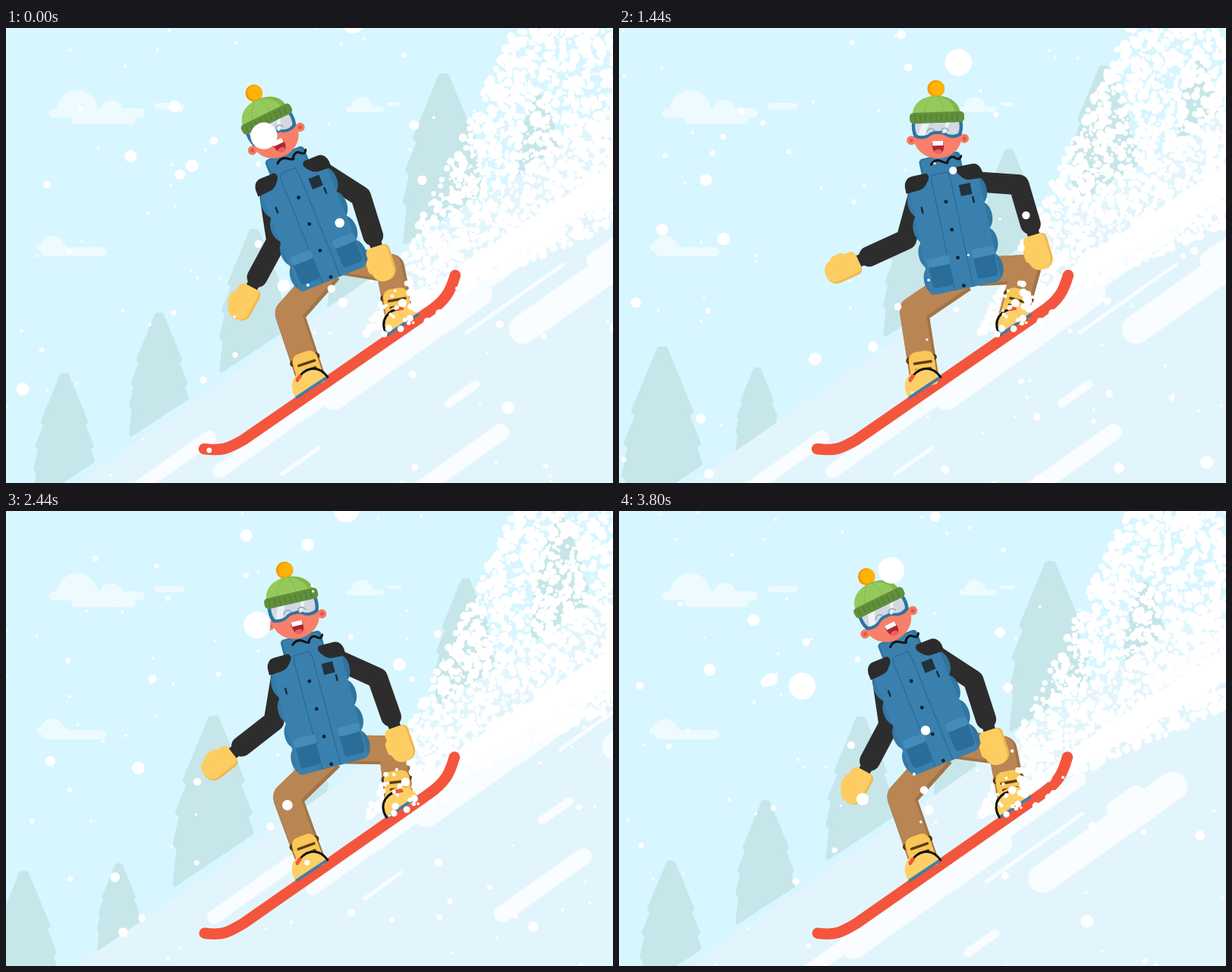
An HTML page with a canvas for the animation above (3.84 s loop, 800 by 600 pixels).

```html
<!DOCTYPE html>
<html lang="en">
<head>
<meta charset="utf-8">
<title>Snowboarder</title>
<style>
html, body { margin: 0; width: 100%; height: 100%; overflow: hidden; background: #d8f6ff; }
canvas { display: block; }
</style>
</head>
<body>
<canvas id="stage" width="800" height="600"></canvas>
<script>
const ctx = document.getElementById('stage').getContext('2d');
const FRAMES = 96, STEP = 40, TAU = Math.PI * 2, RAD = Math.PI / 180;
const mod = (a, b) => ((a % b) + b) % b;

let seed = 41;
const rand = () => (seed = (seed * 16807) % 2147483647) / 2147483647;
const many = (count, make) => Array.from({ length: count }, make);

// ---------- drawing helpers ----------
function fill(color, d) { ctx.fillStyle = color; ctx.fill(new Path2D(d)); }
function stroke(color, width, d, cap = 'round') {
  ctx.strokeStyle = color; ctx.lineWidth = width;
  ctx.lineCap = cap; ctx.lineJoin = 'round';
  ctx.stroke(new Path2D(d));
}
function ellipse(color, x, y, rx, ry = rx) {
  ctx.fillStyle = color;
  ctx.beginPath(); ctx.ellipse(x, y, rx, ry, 0, 0, TAU); ctx.fill();
}
function box(color, x, y, w, h, r = 0) {
  ctx.fillStyle = color;
  ctx.beginPath(); ctx.roundRect(x, y, w, h, r); ctx.fill();
}
function at([x, y], angle, draw) {
  ctx.save(); ctx.translate(x, y); ctx.rotate(angle); draw(); ctx.restore();
}
const poly = pts => 'M' + pts.map(p => p.join()).join('L');

// ---------- pose ----------
// Only the body and the hands are keyed; knees and elbows follow by two-bone IK
const KEYS = [
  { n: 0, hem: [432, 330], tilt: [22, 26], handL: [313, 362], handR: [495, 310] },
  { n: 15, hem: [432, 328], tilt: [26, 27], handL: [281, 338], handR: [461, 306] },
  { n: 36, hem: [458, 342], tilt: [12, 2], handL: [295, 317], handR: [553, 295] },
  { n: 51, hem: [450, 334], tilt: [12, 3], handL: [291, 319], handR: [545, 302] },
  { n: 71, hem: [415, 340], tilt: [18, 24], handL: [272, 351], handR: [494, 313] },
  { n: 83, hem: [413, 349], tilt: [21, 32], handL: [287, 372], handR: [482, 327] }
];
const keyAt = i => KEYS[mod(i, KEYS.length)];
const keyTime = i => keyAt(i).n + FRAMES * Math.floor(i / KEYS.length);

// Periodic cubic Hermite through the keys
function poseAt(n) {
  let i = KEYS.length - 1;
  while (KEYS[i].n > n) i--;
  const span = keyTime(i + 1) - keyTime(i), u = (n - keyTime(i)) / span;
  const ease = u * u * (3 - 2 * u);
  const blend = name => [0, 1].map(c => {
    const v = k => keyAt(k)[name][c];
    const slope = k => (v(k + 1) - v(k - 1)) / (keyTime(k + 1) - keyTime(k - 1)) * span * .8;
    return v(i) + (v(i + 1) - v(i)) * ease
      + slope(i) * u * (1 - u) ** 2 - slope(i + 1) * u * u * (1 - u);
  });
  return { hem: blend('hem'), tilt: blend('tilt'), handL: blend('handL'), handR: blend('handR') };
}

function joint(from, to, upper, lower, bend) {
  const dx = to[0] - from[0], dy = to[1] - from[1];
  const d = Math.min(Math.hypot(dx, dy), upper + lower);
  const open = Math.acos((upper ** 2 + d * d - lower ** 2) / (2 * upper * d));
  const angle = Math.atan2(dy, dx) + bend * open;
  return [from[0] + upper * Math.cos(angle), from[1] + upper * Math.sin(angle)];
}

// ---------- scenery ----------
function clouds() {
  ctx.fillStyle = '#edfbff';
  ctx.beginPath();
  const pill = (x, y, w, h) => ctx.roundRect(x, y, w, h, h / 2);
  const dome = (x, y, r) => { ctx.moveTo(x - r, y); ctx.arc(x, y, r, Math.PI, TAU); };
  pill(57, 106, 126, 12); pill(86, 114, 85, 13); dome(94, 109, 27); dome(139, 110, 15);
  pill(196, 99, 39, 8);
  pill(448, 104, 50, 7); dome(469, 105, 14); pill(502, 98, 19, 5);
  pill(40, 285, 40, 9); pill(47, 289, 85, 12); dome(61, 290, 16);
  ctx.fill();
}

function tree(x, base, h) {
  const w = h * .46, top = base - h, side = [[.04, 0]];
  for (const tier of [1, 2, 3]) {
    const y = .18 + .19 * tier, half = .14 + .27 * Math.sqrt(tier) * .86;
    side.push([Math.min(half, .5), y], [Math.min(half, .5) - .05, y + .025]);
  }
  const place = sign => ([a, b]) => [x + sign * a * w, top + b * h];
  const right = side.slice(0, 5).map(place(1)), left = side.map(place(-1)).reverse();
  const d = poly([...right, [x + .49 * w, base - .69 * w], [x - .5 * w, base - 3], ...left]) + 'Z';
  fill('#c7e6ea', d);
  stroke('#c7e6ea', 6, d);
}
// One tree about every 125 px along the slope, sliding up it once per loop
const TREE_HEIGHTS = [165, 160, 186, 112, 222, 110];
function trees(n) {
  TREE_HEIGHTS.forEach((h, i) => {
    for (const k of [-1, 0]) {
      const run = k + n / FRAMES;
      tree(77 + 125 * i + 832 * run, 623 - 84.5 * i - 576 * run, h);
    }
  });
}

// Streaks: upper end x, y, length, width; the pattern repeats every 6 steps
const STREAK_LAYERS = [
  { speed: 123, lines: [[853, 276, 210, 38], [805, 285, 36, 21], [734, 312, 155, 5],
    [619, 470, 44, 11], [730, 267, 550, 18], [623, 350, 235, 36]] },
  { speed: 109, lines: [[268, 540, 126, 18], [412, 554, 59, 5], [652, 533, 131, 22]] }
];
function streaks(n) {
  for (const { speed, lines } of STREAK_LAYERS)
    for (const [x, y, length, w] of lines)
      for (const k of [-6, 0, 6]) {
        const run = speed * (n % 6 + k);
        at([x + run, y - .708 * run], -35.3 * RAD, () => stroke('#f9fdff', w, `M0,0H${-length}`));
      }
}

// ---------- snow ----------
const cone = (count, low, spread, r, extra) => many(count, () => ({
  phase: rand(), angle: (low + spread * rand() ** 1.12) * RAD, r: r + extra * rand() ** 1.6
}));
const spray = cone(3900, 24, 40, 1.9, 4.4);
const kick = cone(32, 15, 65, 2, 4);
// Bigger flakes are nearer and cross the stage more often per loop
const flakes = [1, 2, 3, 4, 5, 11].flatMap(laps =>
  many(Math.ceil(75 / laps ** 1.6), () => ({
    laps, x: rand() * 860, y: rand() * 774, r: laps * 1.55 + rand() * .7
  })));

function burst(parts, n, x, y, reach, life) {
  ctx.fillStyle = '#fff';
  ctx.beginPath();
  for (const p of parts) {
    const s = (p.phase + n / life) % 1, d = reach * s ** .62;
    const px = x + d * Math.cos(p.angle), py = y - d * Math.sin(p.angle);
    const r = p.r * (.8 + .35 * s);
    ctx.moveTo(px + r, py);
    ctx.arc(px, py, r, 0, TAU);
  }
  ctx.fill();
}
function snowfall(n) {
  for (const f of flakes) {
    const run = f.laps * n / FRAMES;
    ellipse('#fff', mod(f.x + 860 * run, 860) - 30, mod(f.y - 774 * run, 774) - 30, f.r);
  }
}

// ---------- rider ----------
function board(flex) {
  const nx = 261 + 3 * flex, ny = 555 + 7 * flex, tx = 592 - 4 * flex, ty = 326 - 6 * flex;
  stroke('#f4553d', 14.5, `M${nx},${ny}C${nx + 24},${ny + 3} 292,${555 + 5 * flex} 313,${543 + 3 * flex}
    L${556 - 3 * flex},${375 - 2 * flex}C580,${359 - 5 * flex} ${tx - 6},${ty + 21} ${tx},${ty}`);
}

function leg(hip, knee, ankle) {
  const d = poly([hip, knee, ankle]);
  stroke('#a27445', 38, d, 'butt');
  at([-2, -2], 0, () => stroke('#b98553', 34, d, 'butt'));
}

function boot(ankle, knee, plate, side) {
  const angle = Math.atan2(knee[1] - ankle[1], knee[0] - ankle[0]) + Math.PI / 2;
  at(ankle, angle, () => {
    stroke('#5f3d12', 9, 'M-16,-29H16');
    box('#f9c757', -17, -39, 34, 46, [11, 11, 4, 4]);
    stroke('#5f3d12', 3.5, 'M-10,-24H12M-9,-15H10');
  });
  at(plate, -33.5 * RAD, () => {
    ctx.scale(side, 1);
    fill('#fdd067', 'M-25,-1C-25,-20 -10,-27 2,-26C16,-25 25,-14 25,-1Z');
    stroke('#3f7fa8', 4, 'M-25,0H25', 'butt');
    stroke('#111', 3, 'M25,0C24,-22 5,-28 -11,-18');
    stroke('#f4553d', 5, 'M-10,-19L-5,-21');
  });
}

// Draws the sleeve and returns a function that draws its glove later
function arm(shoulder, hand) {
  const elbow = joint(shoulder, hand, 58, 92, -1);
  const angle = Math.atan2(hand[1] - elbow[1], hand[0] - elbow[0]);
  const wrist = [hand[0] - 38 * Math.cos(angle), hand[1] - 38 * Math.sin(angle)];
  stroke('#2d2d2d', 16, poly([wrist, hand]), 'butt');
  stroke('#2d2d2d', 27, poly([shoulder, elbow, wrist]));
  return () => at(hand, angle, () => {
    box('#eeb950', -23, -16, 47, 30, [7, 14, 14, 7]);
    box('#fdcd61', -23, -13, 47, 29, [7, 13, 14, 7]);
    box('#fdcd61', -10, 5, 22, 15, 7);
  });
}

function vest() {
  box('#2f759f', -27, -178, 55, 40, 5);
  for (let y = -122; y < 0; y += 34.4) {
    ellipse('#3579a6', -41, y, 12, 19);
    ellipse('#30759f', 41, y, 12, 19);
  }
  fill('#3a80ae', 'M-24,-176H22L27,-154L46,-150L47,-4Q46,1 40,1H-42Q-48,1 -48,-4L-47,-148L-24,-154Z');
  for (const side of [-1, 1])
    fill('#2b2b2b', `M${52 * side},-137V-146Q${50 * side},-158 ${40 * side},-158H${21 * side}
      Q${15 * side},-153 ${23 * side},-145Q${28 * side},-138 ${36 * side},-138Z`);
  stroke('#2d6c97', 1.5, 'M-16,0V-145L-14,-154H7L9,-145V0');
  for (const x of [-43, 17]) {
    box('#2a6d98', x, -44, 28, 37, 5);
    box('#468cb8', x - 1, -47, 30, 12, 4);
  }
  for (let i = 0; i < 4; i++) ellipse('#16242e', -3, -3 - 37.7 * i, 2.4);
  stroke('#1b2b36', 2.5, 'M-36,-115V-108M33,-115V-108');
  box('#22313c', 18, -134, 15, 15);
}

function head() {
  for (const side of [-1, 1]) {
    ellipse('#f57a64', 35 * side, 0, 6);
    ellipse('#d95a4b', 35 * side, 0, 2.5);
  }
  fill('#f87f69', 'M-32,-26V-6C-32,14 -16,25 0,25S32,14 32,-6V-26Z');
  fill('#ac2730', 'M-8,5L7,2Q10,19 0,19Q-7,19 -8,5Z');
  ellipse('#ec6262', 0, 16, 5, 3);
  fill('#fff', 'M-7,2H7V8H-7Z');
  // goggles
  fill('#2f749f', 'M-33,-25H33Q35,-13 31,-4Q22,1 13,-3Q6,-8 0,-7Q-6,-8 -13,-3Q-22,1 -31,-4Q-35,-13 -33,-25Z');
  fill('#d2d9e2', 'M-29,-22H29Q30,-12 27,-7Q20,-4 13,-7Q7,-12 0,-11Q-7,-12 -13,-7Q-20,-4 -27,-7Q-30,-12 -29,-22Z');
  fill('#eef2f6', 'M-20,-22H-10L-17,-6H-26ZM12,-22H17L10,-8H6Z');
  stroke('#9faebd', 1.8, 'M-14,-11Q-9,-18 -4,-12M5,-12Q10,-18 15,-11');
  // hat
  ellipse('#f59b0d', 0, -67, 11.3);
  ellipse('#ffb304', 1.5, -67, 9.5);
  fill('#84b64b', 'M-32,-32C-32,-66 31,-66 31,-32Z');
  fill('#96c95c', 'M-32,-32C-32,-65 22,-66 25,-32Z');
  stroke('#87ba50', 1, 'M-17,-36Q-14,-50 -4,-57M8,-36Q9,-49 2,-57');
  box('#618f3c', -36, -36, 72, 14, 5);
  for (let x = -29; x < 34; x += 7) stroke('#4f7b30', 1.2, `M${x},-33V-25`);
}

function rider(n) {
  const { hem, tilt, handL, handR } = poseAt(n);
  const flex = (1 - Math.cos(n / 6 * TAU)) / 2;
  const [body, nod] = tilt.map(deg => -deg * RAD);
  const turn = ([ox, oy], angle, x, y) => [
    ox + x * Math.cos(angle) - y * Math.sin(angle),
    oy + x * Math.sin(angle) + y * Math.cos(angle)
  ];
  const onVest = (x, y) => turn(hem, body, x, y);

  const ankleL = [403, 465], ankleR = [519 - 3 * flex, 382 - 3 * flex];
  const hipL = onVest(-2, -13), hipR = onVest(20, -17);
  const kneeL = joint(hipL, ankleL, 78, 92.5, 1);
  const kneeR = joint(hipR, ankleR, 63, 66.5, -1);

  board(flex);
  leg(hipR, kneeR, ankleR);
  leg(hipL, kneeL, ankleL);
  boot(ankleR, kneeR, [523 - 3 * flex, 391 - 3 * flex], -1);
  boot(ankleL, kneeL, [403, 474], 1);
  const gloveL = arm(onVest(-38, -130), handL);
  const gloveR = arm(onVest(40, -134), handR);
  gloveL();
  at(hem, body, vest);
  gloveR();
  burst(kick, n, 488, 408, 95, 12);
  at(turn(onVest(0, -179), nod, 0, -20), nod, head);
  at(hem, body, () =>
    stroke('#141414', 3, 'M-12,-168Q-5,-175 3,-169T10,-168Q16,-175 21,-170T29,-171'));
}

// ---------- loop ----------
function draw(n) {
  ctx.fillStyle = '#d8f6ff';
  ctx.fillRect(0, 0, 800, 600);
  clouds();
  trees(n);
  fill('#e3f5fc', 'M93,600L800,107V600Z');
  streaks(n);
  fill('#fff', 'M500,392L600,342L740,258L800,222V180L610,305Z');
  burst(spray, n, 472, 406, 610, 24);
  rider(n);
  snowfall(n);
}
function tick() {
  draw(Math.floor(performance.now() / STEP) % FRAMES);
  requestAnimationFrame(tick);
}
tick();
</script>
</body>
</html>
```
